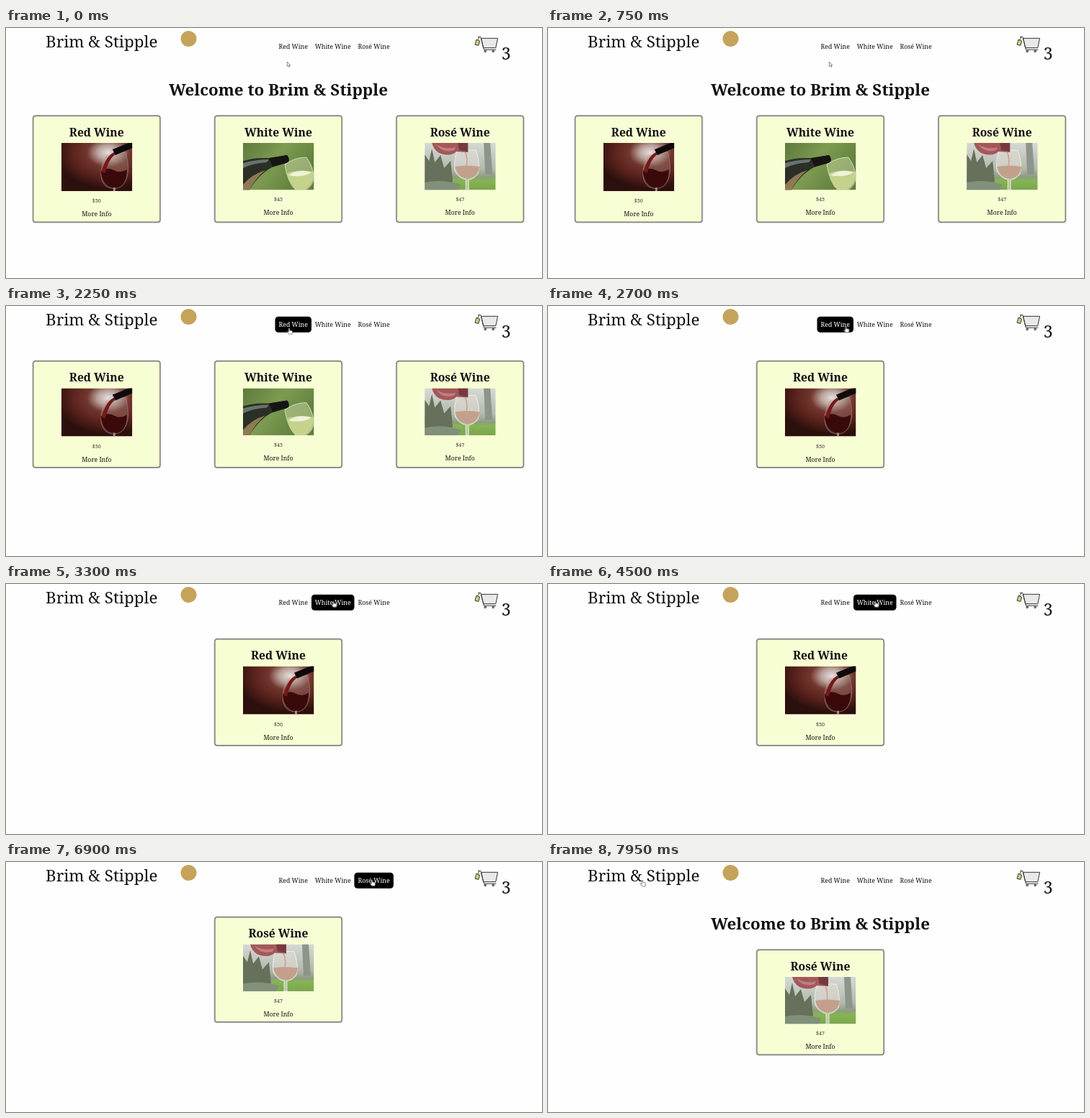
Recreate the animation shown at these times as an HTML page. Size 744 px wide and 348 px high, loop 8 s.

```html
<!DOCTYPE html>
<html lang="en">
<head>
<meta charset="utf-8">
<title>Brim &amp; Stipple</title>
<style>
html, body { margin: 0; width: 100%; height: 100%; overflow: hidden; background: #fefefe; }
svg { display: block; }
text { font-family: "Noto Serif", Cambria, serif; fill: #111; }
.brand { font-size: 22.4px; }
.count { font-size: 23px; text-anchor: middle; }
.welcome { font-size: 22.4px; font-weight: 700; text-anchor: middle; }
.nav text { font-size: 8.8px; text-anchor: middle; }
.nav .hover text { fill: #fff; }
.card text { text-anchor: middle; }
.card .name { font-size: 15.7px; font-weight: 700; }
.card .price { font-size: 7.2px; fill: #333; }
.card .more { font-size: 8.7px; }
.edge { fill: none; stroke: #888; stroke-opacity: .4; stroke-width: 3.2; }
.face { fill: #f8fed4; stroke: #707070; stroke-width: 1.2; }

/* every state change is a hard cut within one 8 s loop */
.welcome, .card, .card rect, .hover, .arrow, .hand { animation: 8s step-end infinite; }
.welcome { animation-name: welcome; }
@keyframes welcome {
  0%, 99.375% { visibility: visible; }
  28.125% { visibility: hidden; }
}

.red { animation-name: red; }
@keyframes red {
  0% { transform: translate(125.8px, 122.4px); visibility: visible; }
  28.125% { transform: translate(125.8px, 76.9px); visibility: visible; }
  30% { transform: translate(378px, 76.9px); visibility: visible; }
  58.125%, 100% { transform: translate(378px, 76.9px); visibility: hidden; }
}
.white { animation-name: white; }
@keyframes white {
  0% { transform: translate(378px, 122.4px); visibility: visible; }
  28.125% { transform: translate(378px, 76.9px); visibility: visible; }
  30% { transform: translate(378px, 76.9px); visibility: hidden; }
  58.125% { transform: translate(378px, 76.9px); visibility: visible; }
  80.625%, 100% { transform: translate(378px, 76.9px); visibility: hidden; }
}
.rose { animation-name: rose; }
@keyframes rose {
  0% { transform: translate(630.2px, 122.4px); visibility: visible; }
  28.125% { transform: translate(630.2px, 76.9px); visibility: visible; }
  30% { transform: translate(630.2px, 76.9px); visibility: hidden; }
  80.625% { transform: translate(378px, 76.9px); visibility: visible; }
  99.375%, 100% { transform: translate(378px, 122.4px); visibility: visible; }
}
/* the lone cards are shorter than the row */
.white .box, .rose .box { animation-name: shrink; }
@keyframes shrink {
  0% { height: 147.8px; }
  30%, 100% { height: 145.8px; }
}

.on-red { animation-name: on-red; }
@keyframes on-red {
  0%, 35.625%, 100% { visibility: hidden; }
  18.75% { visibility: visible; }
}
.on-white { animation-name: on-white; }
@keyframes on-white {
  0%, 67.5%, 90%, 100% { visibility: hidden; }
  35.625%, 88.125% { visibility: visible; }
}
.on-rose { animation-name: on-rose; }
@keyframes on-rose {
  0%, 88.125%, 100% { visibility: hidden; }
  67.5% { visibility: visible; }
}

/* the pointer advances every 150 ms */
.pointer { animation: travel 8s infinite; }
@keyframes travel {
  0% { transform: translate(390px, 47px); animation-timing-function: step-end; }
  11.25% { transform: translate(390px, 47px); animation-timing-function: steps(4); }
  18.75% { transform: translate(385px, 36.5px); animation-timing-function: steps(4); }
  26.25% { transform: translate(393px, 30.5px); animation-timing-function: step-end; }
  31.875% { transform: translate(393px, 30.5px); animation-timing-function: steps(3); }
  37.5% { transform: translate(454.5px, 23.5px); animation-timing-function: step-end; }
  63.75% { transform: translate(454.5px, 23.5px); animation-timing-function: steps(3); }
  69.375% { transform: translate(508px, 24.5px); animation-timing-function: step-end; }
  86.25% { transform: translate(508px, 24.5px); animation-timing-function: steps(5); }
  95.625%, 100% { transform: translate(131px, 25px); animation-timing-function: step-end; }
}
.arrow { animation-name: arrow; }
@keyframes arrow {
  0%, 90% { visibility: visible; }
  18.75%, 93.75%, 100% { visibility: hidden; }
}
.hand { animation-name: hand; }
@keyframes hand {
  0%, 90% { visibility: hidden; }
  18.75%, 93.75%, 100% { visibility: visible; }
}
</style>
</head>
<body>
<svg width="744" height="348" viewBox="0 0 744 348">
  <defs>
    <radialGradient id="cellar" cx=".66" cy=".2" r=".75">
      <stop offset="0" stop-color="#e6dfdc"/>
      <stop offset=".2" stop-color="#b9a29b"/>
      <stop offset=".4" stop-color="#71372e"/>
      <stop offset=".7" stop-color="#58211b"/>
      <stop offset="1" stop-color="#2c100d"/>
    </radialGradient>
    <linearGradient id="meadow" x2="1" y2=".5">
      <stop offset="0" stop-color="#5d7a3d"/>
      <stop offset=".5" stop-color="#7d9b50"/>
      <stop offset="1" stop-color="#5f7e3c"/>
    </linearGradient>
    <linearGradient id="garden" y2="1" x2="0">
      <stop offset="0" stop-color="#d5d9d5"/>
      <stop offset=".55" stop-color="#b3b9ad"/>
      <stop offset=".72" stop-color="#8f9b83"/>
      <stop offset=".8" stop-color="#84b651"/>
      <stop offset="1" stop-color="#7da352"/>
    </linearGradient>
    <clipPath id="tall"><rect width="98.5" height="67"/></clipPath>
    <clipPath id="wide"><rect width="98.5" height="65.4"/></clipPath>
  </defs>

  <text class="brand" x="55" y="27">Brim &amp; Stipple</text>
  <circle cx="253.5" cy="15" r="11" fill="#c5a35b"/>

  <g class="nav">
    <text x="398.7" y="29.4">Red Wine</text>
    <text x="453.7" y="29.4">White Wine</text>
    <text x="510.6" y="29.4">Rosé Wine</text>
    <g class="hover on-red">
      <rect x="373.5" y="14.8" width="50.5" height="22" rx="4.5"/>
      <text x="398.7" y="29.4">Red Wine</text>
    </g>
    <g class="hover on-white">
      <rect x="424" y="14.8" width="59.5" height="22" rx="4.5"/>
      <text x="453.7" y="29.4">White Wine</text>
    </g>
    <g class="hover on-rose">
      <rect x="483.4" y="14.8" width="54.5" height="22" rx="4.5"/>
      <text x="510.6" y="29.4">Rosé Wine</text>
    </g>
  </g>

  <g fill="none" stroke="#333" stroke-width="1" stroke-linejoin="round" stroke-linecap="round">
    <path d="M660 14.3H682.6L679.8 27.6H663Z" fill="#e9e9e9"/>
    <path d="M655.5 12.3H658.8L663.4 30.2H680"/>
    <path d="M656.8 13L654.5 17"/>
    <path d="M653.3 16.3L657.6 18.2L655.8 24.4L651.4 23.2Z" fill="#d5cd76"/>
    <circle cx="665.2" cy="32.3" r="1.3" fill="#bbb"/>
    <circle cx="676.2" cy="32.3" r="1.3" fill="#bbb"/>
  </g>
  <text class="count" x="694.3" y="44.3">3</text>

  <text class="welcome" x="378" y="93.7">Welcome to Brim &amp; Stipple</text>

  <g class="card red">
    <rect class="edge" x="-88" width="176" height="147.8" rx="3"/>
    <rect class="face" x="-88" width="176" height="147.8" rx="3"/>
    <text class="name" y="28.4">Red Wine</text>
    <g transform="translate(-49 37.6)" clip-path="url(#tall)">
      <rect width="98.5" height="67" fill="url(#cellar)"/>
      <path d="M62 17C53 35 52 53 63 61Q74 67 84 60C94 51 95 31 89 13Z" fill="#a88a84" fill-opacity=".3" stroke="#d9bdb7" stroke-opacity=".5" stroke-width=".7"/>
      <path d="M55 39Q64 33 73 38T91 37C91 50 87 59 79 62C66 65 56 55 55 39Z" fill="#3a0a0b"/>
      <path d="M73 13C66 16 60 25 56 40L61 42C64 29 68 21 75 16Z" fill="#761818"/>
      <path d="M72 62H75V67H72Z" fill="#a98780"/>
      <path d="M71 9L98.5 -2V7L75 17Z" fill="#0e0a0b"/>
    </g>
    <text class="price" y="121">$50</text>
    <text class="more" y="139.8">More Info</text>
  </g>

  <g class="card white">
    <rect class="edge box" x="-88" width="176" height="147.8" rx="3"/>
    <rect class="face box" x="-88" width="176" height="147.8" rx="3"/>
    <text class="name" y="28.4">White Wine</text>
    <g transform="translate(-49 37.6)" clip-path="url(#wide)">
      <rect width="98.5" height="65.4" fill="url(#meadow)"/>
      <path d="M0 25C17 20 25 21 37 21L61 17Q65 21 63 27L40 34C27 41 17 52 9 65.4H0Z" fill="#2b2f28"/>
      <path d="M0 28Q18 23 36 23L33 27Q14 28 0 35Z" fill="#68736b"/>
      <path d="M0 58Q13 43 31 38Q17 49 9 65.4H0Z" fill="#8d7a52"/>
      <path d="M36 21L61 17Q65 21 63 27L41 33Z" fill="#171513"/>
      <path d="M58 30Q72 20 88 20Q98 34 98 48Q97 60 87 65.4H73Q62 55 58 30Z" fill="#c9d8a4" fill-opacity=".5" stroke="#e4ecd0" stroke-width=".8"/>
      <path d="M61 42Q76 36 97 40Q99 58 85 65.4H74Q65 60 61 42Z" fill="#c5d28c"/>
      <path d="M63 45Q77 35 95 41Q82 49 63 45Z" fill="#edf2d9"/>
    </g>
    <text class="price" y="119">$45</text>
    <text class="more" y="137.9">More Info</text>
  </g>

  <g class="card rose">
    <rect class="edge box" x="-88" width="176" height="147.8" rx="3"/>
    <rect class="face box" x="-88" width="176" height="147.8" rx="3"/>
    <text class="name" y="28.4">Rosé Wine</text>
    <g transform="translate(-49 37.6)" clip-path="url(#wide)">
      <rect width="98.5" height="65.4" fill="url(#garden)"/>
      <path d="M0 16L6 25L10 8L14 27L22 17L27 35L36 25L39 54L25 58L0 55Z" fill="#66705a"/>
      <path d="M82 0H91L94 44H84Z" fill="#8d948a"/>
      <path d="M0 55Q25 50 50 58L46 65.4H0Z" fill="#81907a"/>
      <path d="M45 10H71Q78 30 74 43Q69 50 61 51V65.4H57V51Q47 49 42 39Q40 25 45 10Z" fill="#dfddd5" fill-opacity=".6" stroke="#f5f3ed" stroke-width=".8"/>
      <path d="M42 33Q58 30 76 33Q75 46 61 50Q46 49 42 33Z" fill="#c3a08c"/>
      <path d="M56 13Q60 20 58 34" fill="none" stroke="#cfa092" stroke-width="1.6"/>
      <path d="M10 0H60V13L44 12Q35 20 20 14Q12 9 10 0Z" fill="#a4575a"/>
      <path d="M16 2Q29 10 43 6L41 10Q25 15 16 2Z" fill="#bf7f7e"/>
      <path d="M46 0H60V12L48 10Z" fill="#753a40"/>
    </g>
    <text class="price" y="119">$47</text>
    <text class="more" y="137.9">More Info</text>
  </g>

  <g class="pointer" fill="#fff" stroke="#555" stroke-width=".7" stroke-linejoin="round">
    <path class="arrow" d="M.3 0V6.4L1.8 5.1L2.8 7.3L3.9 6.8L2.9 4.7H4.8Z"/>
    <path class="hand" d="M-.8 .8Q0 -.4 .8 .8V3.4L3.8 4Q4.8 4.3 4.6 5.4L4 8.8H-.3L-2.7 5.6Q-2.7 4.5 -1.6 5L-.8 5.8Z"/>
  </g>
</svg>
</body>
</html>
```
